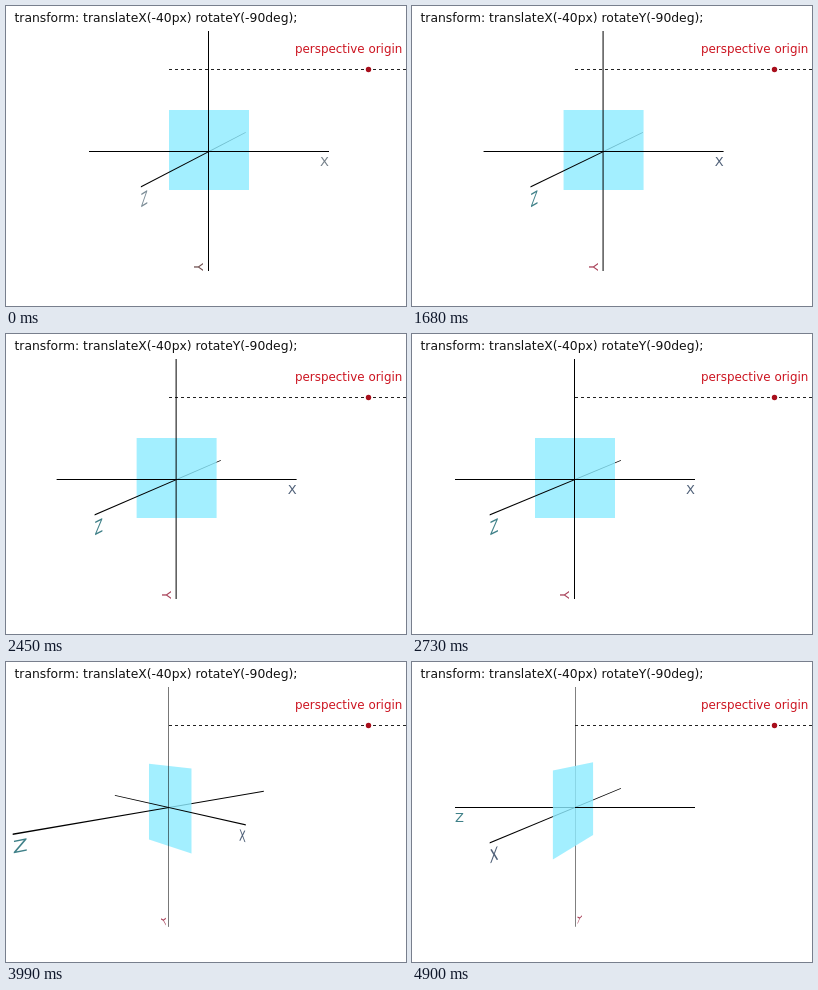
Animation of 400 by 300 pixels, one loop 5670 ms. Source, as an HTML page with a canvas:

```html
<!DOCTYPE html>
<html lang="en">
<head>
<meta charset="utf-8">
<title>Order of transforms</title>
<style>
  html, body { margin: 0; width: 100%; height: 100%; overflow: hidden; background: #fff; }
  canvas { display: block; width: 400px; height: 300px; }
</style>
</head>
<body>
<canvas id="stage" width="400" height="300"></canvas>
<script>
const ctx = document.getElementById('stage').getContext('2d');
const FONT = '"DejaVu Sans", Verdana, sans-serif';
const LOOP = 5670, TICK = 70;
const EYE = { x: 362, y: 63, d: 400 };
const HOME = { x: 203, y: 145 };
const HALF = 120;

let cx, cos, sin, resting;

const clamp = (v, lo, hi) => Math.max(lo, Math.min(hi, v));
const ticks = (t, start, max) => clamp(Math.floor((t - start) / TICK) + 1, 0, max);

// Local 3D point -> screen, after translateX and rotateY.
function project([x, y, z]) {
  const rx = cx + x * cos - z * sin;
  const rz = x * sin + z * cos;
  const k = EYE.d / (EYE.d - rz);
  return [EYE.x + (rx - EYE.x) * k, EYE.y + (HOME.y + y - EYE.y) * k];
}

// Each plane maps its own (u, v) to local space.
const planes = {
  x: (u, v) => [u, v, 0],
  y: (u, v) => [-v, u, 0],
  z: (u, v) => [0, v, -u]
};

function rect(plane, u0, v0, u1, v1, color) {
  ctx.fillStyle = color;
  ctx.beginPath();
  for (const [u, v] of [[u0, v0], [u1, v0], [u1, v1], [u0, v1]]) {
    ctx.lineTo(...project(plane(u, v)));
  }
  ctx.fill();
}

function label(plane, text, u, color, calm) {
  const v = 15, step = 9;
  const dir = u > 0 ? -1 : 1;
  const o = project(plane(u, v));
  const a = project(plane(u + dir * step, v));
  const b = project(plane(u, v - step));
  ctx.save();
  ctx.transform(
    dir * (a[0] - o[0]) / step, dir * (a[1] - o[1]) / step,
    (o[0] - b[0]) / step, (o[1] - b[1]) / step, o[0], o[1]);
  ctx.font = '13px ' + FONT;
  ctx.textAlign = u > 0 ? 'right' : 'left';
  ctx.fillStyle = resting ? calm : color;
  ctx.fillText(text, 0, 0);
  ctx.restore();
}

const line = (plane, from, to) => rect(plane, from, 0, to, 1, '#000');

function backZ() { line(planes.z, 0, HALF); }

function frontZ() {
  line(planes.z, -HALF, 0);
  label(planes.z, 'Z', -HALF, '#3f8088', '#7b8c96');
}

function square() { rect(planes.x, -40, -41, 40, 39, 'rgba(140, 235, 255, 0.8)'); }

function flatAxes() {
  line(planes.x, -HALF, HALF);
  label(planes.x, 'X', HALF, '#4f6078', '#75808a');
  line(planes.y, -HALF, HALF);
  label(planes.y, 'Y', HALF, '#a84058', '#705050');
}

function text(str, x, y, size, color) {
  ctx.font = size + 'px ' + FONT;
  ctx.textAlign = 'left';
  ctx.fillStyle = color;
  ctx.fillText(str, x, y);
}

function captions() {
  text('transform: translateX(-40px) rotateY(-90deg);', 8.5, 16, 12.35, '#111');
  text('perspective origin', 289, 47, 11.9, '#cc1420');
  ctx.fillStyle = '#222';
  for (let x = 163; x < 400; x += 6) ctx.fillRect(x, 63, 3, 1);
  ctx.fillStyle = '#a80f1c';
  ctx.beginPath();
  ctx.arc(362.5, 63.5, 2.7, 0, Math.PI * 2);
  ctx.fill();
}

function draw(t) {
  const shift = ticks(t, 1330, 21) * 40 / 21;
  const angle = clamp(4.3 * (ticks(t, 3430, 22) - 0.8), 0, 90) * Math.PI / 180;
  cx = HOME.x - shift;
  cos = Math.cos(angle);
  sin = Math.sin(angle);
  resting = shift === 0;

  ctx.fillStyle = '#fff';
  ctx.fillRect(0, 0, 400, 300);
  captions();

  // Once the plane turns its back to the viewer, the stacking reverses.
  const layers = [backZ, square, flatAxes, frontZ];
  if (EYE.d * cos < (EYE.x - cx) * sin) layers.reverse();
  layers.forEach(f => f());
}

function loop() {
  draw(performance.now() % LOOP);
  requestAnimationFrame(loop);
}
loop();
</script>
</body>
</html>
```
